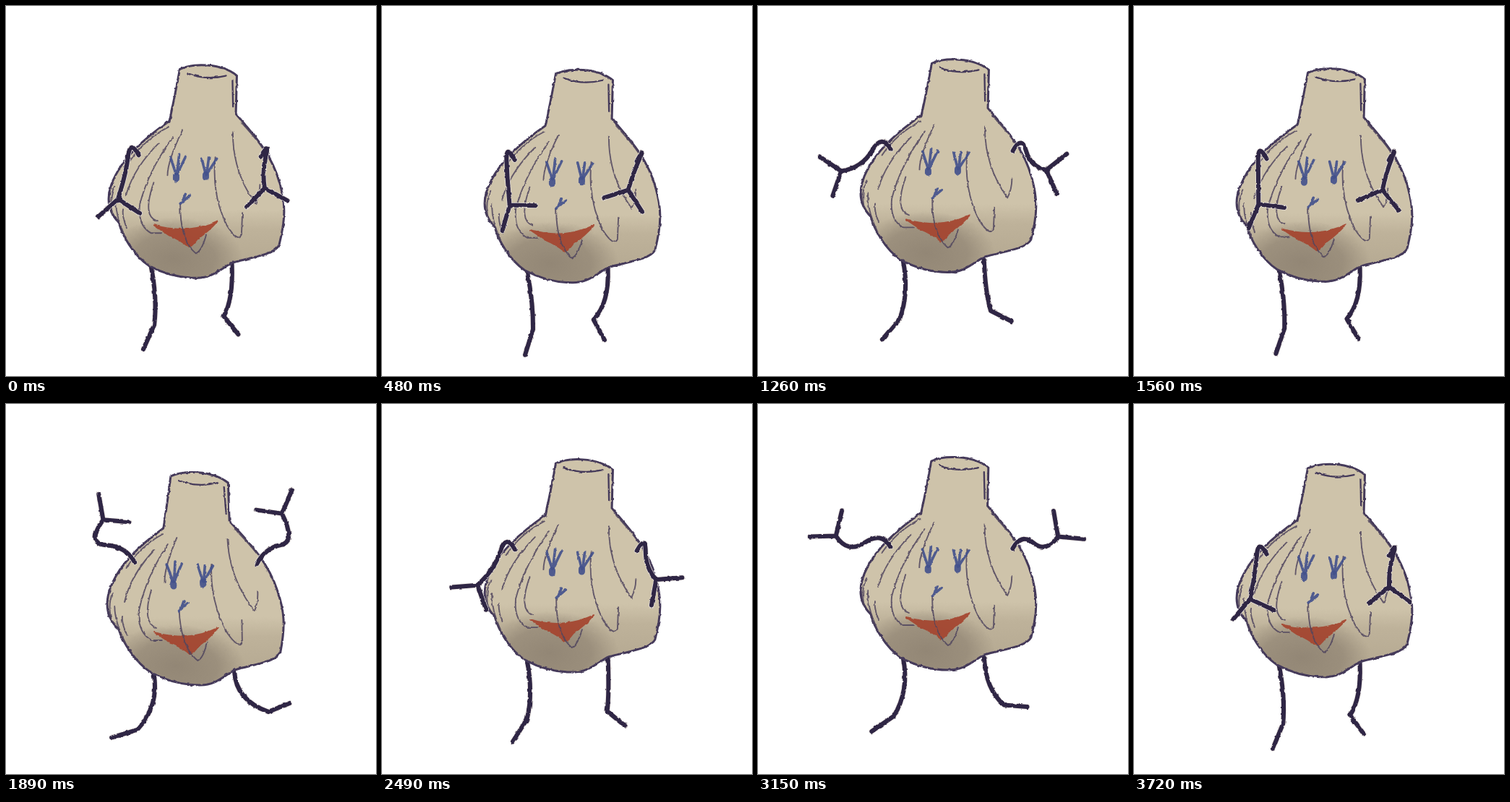
Recreate the animation shown at these times as an HTML page. Size 512 px wide and 512 px high, loop 3.75 s.

```html
<!DOCTYPE html>
<html lang="en">
<head>
<meta charset="utf-8">
<title>Dancing garlic</title>
<style>
  html, body { margin: 0; width: 100%; height: 100%; overflow: hidden; background: #fff; }
  svg { display: block; width: 100vw; height: 100vh; fill: none; stroke-linecap: round; stroke-linejoin: round; }
  .skin { fill: url(#skin); }
  .shade { fill: url(#shade); }
  .mouth { fill: #a5452f; stroke: #a5452f; stroke-width: 2; opacity: .92; }
  .outline { stroke: #453a5a; stroke-width: 3; }
  .rim { stroke: #453a5a; stroke-width: 2.3; }
  .crease { stroke: #51465f; stroke-width: 1.9; opacity: .85; }
  .eye { stroke: #42508c; stroke-width: 3.6; opacity: .9; }
  .pupil { stroke: #42508c; stroke-width: 9; opacity: .9; }
  .halo { stroke: #e9e3dd; stroke-width: 7.5; }
  .limb { stroke: #2f2645; stroke-width: 6; }
</style>
</head>
<body>
<svg viewBox="0 0 512 512">
  <defs>
    <filter id="rough" filterUnits="userSpaceOnUse" x="0" y="0" width="512" height="512" color-interpolation-filters="sRGB">
      <feTurbulence type="fractalNoise" baseFrequency=".16" numOctaves="2" seed="4"/>
      <feDisplacementMap in="SourceGraphic" scale="3" xChannelSelector="R" yChannelSelector="G"/>
    </filter>
    <linearGradient id="skin" gradientUnits="userSpaceOnUse" x1="0" y1="80" x2="0" y2="378">
      <stop offset="0" stop-color="#cec3aa"/>
      <stop offset=".68" stop-color="#cec3aa"/>
      <stop offset=".77" stop-color="#beb29a"/>
      <stop offset="1" stop-color="#b2a68f"/>
    </linearGradient>
    <radialGradient id="shade" gradientUnits="userSpaceOnUse" cx="232" cy="350" r="95" gradientTransform="translate(0 140) scale(1 .6)">
      <stop offset="0" stop-color="#8c8070" stop-opacity=".85"/>
      <stop offset=".6" stop-color="#8c8070" stop-opacity=".65"/>
      <stop offset="1" stop-color="#8c8070" stop-opacity="0"/>
    </radialGradient>
    <path id="bulb" d="M238 88C255 80 295 79 317 97L316 150C340 178 366 205 377 245C386 275 386 295 377 332C370 345 340 348 312 356C295 366 283 378 262 377C235 377 212 368 197 360C175 345 160 318 155 300C137 282 137 260 150 235C165 205 195 180 224 160C229 138 234 110 238 88Z"/>
  </defs>
  <g filter="url(#rough)">
    <g id="legs"></g>
    <g id="body">
      <use href="#bulb" class="skin"/>
      <use href="#bulb" class="shade"/>
      <path class="mouth" d="M204 304Q250 318 292 298Q280 312 264 323Q256 334 252 334Q240 324 225 318Z"/>
      <use href="#bulb" class="outline"/>
      <path class="rim" d="M249 94Q275 104 303 97M311 103L312 140"/>
      <path class="crease" d="M242 173Q222 215 222 235M229 182Q195 230 184 275Q181 305 200 315L214 315
        M210 190Q175 225 165 262M203 245Q187 292 208 298M240 275Q240 325 262 343Q270 340 276 318
        M288 210Q283 262 305 305Q320 328 325 317L326 287M312 175Q312 230 344 274Q350 262 350 248
        M151 268Q150 290 163 318M161 282Q159 290 166 308M149 250Q141 265 146 290
        M223 168Q190 185 170 215M322 160Q345 185 353 197"/>
      <path class="eye" d="M234 234L226 210M235 234L238 206M235 234L247 209M275 234L269 211M276 234L279 211M276 234L290 212M240 274L253 263M243 271L247 261"/>
      <path class="pupil" d="M234 236L234 240M275 234L275 238"/>
    </g>
    <g id="arms"></g>
  </g>
</svg>
<script>
const LOOP = 3750, STEP = 30;

// Turning points of the dance: time, lift (-1 arms folded, 1 arms raised)
const turns = [[-190, -1], [230, -.4], [500, -1], [940, 1], [1520, -1], [1890, 1], [2270, -1], [2900, 1], [3560, -1], [3980, -.4]];

// Angles are [at mid lift, change with lift], in degrees; side is -1 for left, 1 for right
const arms = [
  { side: -1, start: [182, 207], pivot: [170, 205], reach: [65, 0], swing: [73, 78], hand: [-55, -130] },
  { side: 1, start: [351, 209], pivot: [350, 202], reach: [60, 12], swing: [68, 82], hand: [-57, -115] }
];
const legs = [
  { side: -1, hip: [200, 360], shin: 82, foot: 37, knee: [9, 5], swing: [5, 11], toe: [45, 28] },
  { side: 1, hip: [312, 358], shin: 73, foot: 32, knee: [2, 12], swing: [12, 28], toe: [70, 42] }
];

const $ = id => document.getElementById(id);
const at = ([base, change], lift) => base + change * lift;

// Point at a distance from another, turned outwards from straight down
function polar([x, y], radius, degrees, side) {
  const a = degrees * Math.PI / 180;
  return [x + side * radius * Math.sin(a), y + radius * Math.cos(a)];
}

function liftAt(t) {
  const i = turns.findIndex(turn => turn[0] > t);
  const [t0, a] = turns[i - 1], [t1, b] = turns[i];
  return a + (b - a) * (1 - Math.cos(Math.PI * (t - t0) / (t1 - t0))) / 2;
}

function armPath({ side, start, pivot, reach, swing, hand }, lift, onBody) {
  const [sx, sy] = onBody(start), centre = onBody(pivot);
  const angle = at(swing, lift);
  const wrist = polar(centre, at(reach, lift), angle, side);
  const elbow = polar(centre, 42 + 18 * lift, angle * .75, side);
  const shoulder = [sx + side * 12, sy - 22];
  const middle = shoulder.map((v, i) => (v + elbow[i]) / 2);
  const inner = 90 - at(hand, lift);
  const fingers = [inner, inner - 105].map(a => `M${wrist}L${polar(wrist, 36, a, side)}`).join('');
  return `M${sx} ${sy}Q${shoulder} ${middle}Q${elbow} ${wrist}${fingers}`;
}

function legPath({ side, hip, shin, foot, knee, swing, toe }, lift, onBody) {
  const [hx, hy] = onBody(hip);
  const ankle = polar([hx, hy], shin, at(swing, lift), side);
  const tip = polar(ankle, foot, at(toe, lift), side);
  return `M${hx} ${hy}Q${hx + knee[0]} ${(hy + ankle[1]) / 2 + knee[1]} ${ankle}L${tip}`;
}

function makeLimb(parent, shape, part) {
  const paths = ['halo', 'limb'].map(name => {
    const path = document.createElementNS('http://www.w3.org/2000/svg', 'path');
    path.setAttribute('class', name);
    return parent.appendChild(path);
  });
  return (lift, onBody) => paths.forEach(path => path.setAttribute('d', shape(part, lift, onBody)));
}
const limbs = [
  ...legs.map(leg => makeLimb($('legs'), legPath, leg)),
  ...arms.map(arm => makeLimb($('arms'), armPath, arm))
];

function draw(now) {
  const lift = liftAt(Math.floor(now % LOOP / STEP) * STEP);
  // The body rides high at mid swing, sinks at both ends and leans when the arms are up
  const dx = 1, dy = -9 + (lift > 0 ? 21 * lift ** 6 : 15 * lift ** 2);
  const skew = (1.5 - 12.5 * Math.max(lift, 0) ** 3) / 210;
  const onBody = ([x, y]) => [x + dx + skew * (300 - y), y + dy];
  $('body').setAttribute('transform', `matrix(1 0 ${-skew} 1 ${dx + skew * 300} ${dy})`);
  limbs.forEach(update => update(lift, onBody));
}

const start = performance.now();
function tick() {
  draw(performance.now() - start);
  requestAnimationFrame(tick);
}
tick();
</script>
</body>
</html>
```
